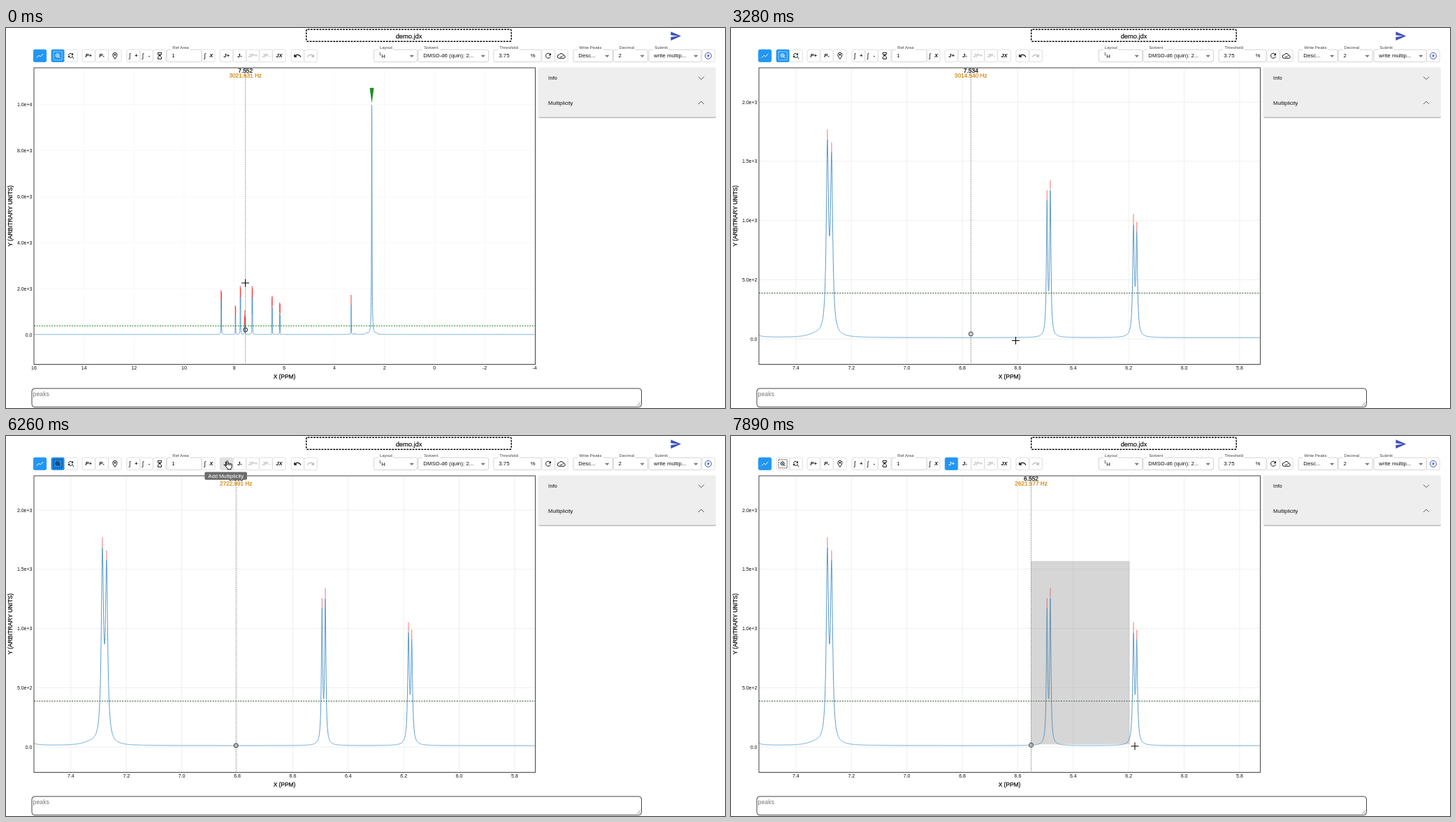
Write an HTML page that moves like this. It is 1029 px wide and 544 px high and loops after 8 s.

```html
<!DOCTYPE html>
<html lang="en">
<head>
<meta charset="utf-8">
<title>Spectrum viewer</title>
<style>
  html, body { margin: 0; width: 100%; height: 100%; overflow: hidden; background: #fff; }
  svg { display: block; width: 100vw; height: 100vh; font-family: "Liberation Sans", Arial, sans-serif; }
</style>
</head>
<body>
<svg id="stage" viewBox="0 0 1029 544"></svg>
<script>
const LOOP = 8000;
const MHZ = 400.13;
const PLOT = { x: 40, y: 57, width: 717.5, height: 424.5 };
const BLUE = '#2196f3', INDIGO = '#3f51b5', INK = '#111';
const stage = document.getElementById('stage');

function set(el, attrs) {
  for (const key in attrs) el.setAttribute(key, attrs[key]);
  return el;
}
function add(parent, tag, attrs, text = '') {
  const el = set(document.createElementNS('http://www.w3.org/2000/svg', tag), attrs);
  el.textContent = text;
  return parent.appendChild(el);
}
function show(el, on) {
  el.style.display = on ? '' : 'none';
}
const label = (parent, x, y, size, text, attrs = {}) =>
  add(parent, 'text', { x, y, 'font-size': size, fill: INK, ...attrs }, text);
const box = (parent, x, y, width, height, attrs) =>
  add(parent, 'rect', { x, y, width, height, fill: 'none', ...attrs });
const line = (parent, d, stroke, attrs = {}) =>
  add(parent, 'path', { d, fill: 'none', stroke, ...attrs });
const centered = { 'text-anchor': 'middle' };
const strong = color => ({ ...centered, fill: color, stroke: color, 'stroke-width': .2 });

function range(from, to, step) {
  const count = Math.round((to - from) / step);
  return Array.from({ length: count + 1 }, (_, i) => from + i * step);
}

// ---- Spectrum
// Each line is [ppm, height, half width]; the inner lines of a triplet are the tallest.
function multiplet(centre, height, count, spacing, width) {
  const middle = (count - 1) / 2;
  return range(-middle, middle, 1).map(k =>
    [centre - k * spacing, height * (1 - .08 * k) * (Math.abs(k) === 1 ? .55 : 1), width]);
}
const marked = [
  multiplet(8.519, 1270, 2, .012, .005),
  multiplet(7.95, 720, 2, .011, .004),
  multiplet(7.752, 1440, 2, .013, .005),
  multiplet(7.573, 590, 3, .018, .004),
  multiplet(7.2789, 1479, 2, .0151, .0048),
  multiplet(6.4886, 1150, 2, -.0119, .0027),
  multiplet(6.1769, 862, 2, .0118, .0034),
  multiplet(3.33, 1290, 1, 0, .005)
].flat();
const solvent = [2.505, 10050, .011];
const traces = [[7.33, 22, .03], [3.18, 60, .01], [2.7, 60, .03], [2.33, 60, .02]];
const lines = [...marked, solvent, ...traces];
const intensity = ppm => lines.reduce(
  (sum, [at, height, w]) => sum + height * w * w / (w * w + (ppm - at) ** 2), 10);

const overview = {
  x: ppm => 40 + (16 - ppm) * 35.83, y: v => 439 - v * .03295,
  from: -4, to: 16, step: .002, ppmTicks: range(-4, 16, 2), yTicks: range(0, 10000, 2000),
  digits: 0, grid: '#f8f8f8', threshold: '#1c8a1c', markOpacity: .9
};
const zoomed = {
  x: ppm => 92.9 + (7.4 - ppm) * 396.9, y: v => 445 - v * .1695,
  from: 5.72, to: 7.54, step: .0005, ppmTicks: range(5.8, 7.4, .2), yTicks: range(0, 2000, 500),
  digits: 1, grid: '#efefef', threshold: '#355a35', markOpacity: .65
};

function drawView(view) {
  const g = add(stage, 'g');
  for (const ppm of view.ppmTicks) {
    const x = view.x(ppm);
    line(g, `M${x} ${PLOT.y}v${PLOT.height}`, view.grid);
    label(g, x, 488.6, 7, ppm.toFixed(view.digits), centered);
  }
  for (const v of view.yTicks) {
    const y = view.y(v);
    line(g, `M${PLOT.x} ${y}h${PLOT.width}`, view.grid);
    label(g, 37.5, y + 2.5, 7, v ? v.toExponential(1) : '0.0', { 'text-anchor': 'end' });
  }
  const inner = add(g, 'g', { 'clip-path': 'url(#plot)' });
  const points = range(view.from, view.to, view.step)
    .map(ppm => view.x(ppm).toFixed(2) + ' ' + view.y(intensity(ppm)).toFixed(1));
  line(inner, 'M' + points.join('L'), '#5b9bcc', { 'stroke-linejoin': 'round' });
  for (const [ppm] of marked) {
    line(inner, `M${view.x(ppm)} ${view.y(intensity(ppm))}v-14`, '#f5281e', { opacity: view.markOpacity });
  }
  const [ppm, height] = solvent;
  add(inner, 'path', { d: `M${view.x(ppm)} ${view.y(height)}l-3-22h6z`, fill: '#1f8f1f' });
  const threshold = Math.floor(view.y(387)) + .5;
  line(inner, `M${PLOT.x} ${threshold}h${PLOT.width}`, view.threshold, { 'stroke-dasharray': '2 1.6' });
  return g;
}

add(add(stage, 'clipPath', { id: 'plot' }), 'rect', PLOT);
const overviewLayer = drawView(overview);
const zoomedLayer = drawView(zoomed);

const brush = box(stage, 0, 0, 0, 0, { fill: '#777', 'fill-opacity': .3 });
add(stage, 'rect', { ...PLOT, fill: 'none', stroke: '#444' });
label(stage, 398.5, 501.7, 8.4, 'X (PPM)', strong('#000'));
label(stage, 0, 0, 8.3, 'Y (ARBITRARY UNITS)', { ...strong('#000'), transform: 'translate(9.3 269) rotate(-90)' });

const probe = add(stage, 'g');
line(probe, `M0 ${PLOT.y}v${PLOT.height}`, '#555', { 'stroke-width': .8, 'stroke-dasharray': '1.3 1.4' });
const dot = add(probe, 'circle', { r: 3, fill: '#777', 'fill-opacity': .2, stroke: '#333' });
const ppmText = label(probe, 0, 63.8, 8.4, '', strong('#000'));
const hzText = label(probe, 0, 71.2, 8.2, '', strong('#d48209'));

// ---- Header, side panel and text area
box(stage, 429.7, 2, 293.5, 17.3, { rx: 2, stroke: '#000', 'stroke-width': 1.4, 'stroke-dasharray': '2.8 1.4' });
label(stage, 576.5, 15.2, 9.3, 'demo.jdx', strong(INK));
add(stage, 'path', { d: 'M2 21L23 12 2 3v7l15 2-15 2z', fill: INDIGO, transform: 'translate(950 3.2) scale(.7)' });
box(stage, 762, 58, 254, 71, { fill: '#bbb', rx: 2 });
box(stage, 761.5, 56.5, 254.5, 71, { fill: '#eee', rx: 2 });
label(stage, 776, 74.2, 7.7, 'Info');
label(stage, 776, 109.7, 7.7, 'Multiplicity');
line(stage, 'M991 69.7l4 4 4-4M991 109l4-4 4 4', '#555');
box(stage, 37, 516, 872.5, 26.7, { rx: 4, stroke: '#444' });
label(stage, 38.5, 526.8, 8.8, 'peaks', { fill: '#777' });
line(stage, 'M903 541l5-5M906 541l2-2', '#666', { 'stroke-width': .7 });

// ---- Toolbar
const PITCH = 18.85, MIDDLE = 39.8;
const button = (x, width = PITCH - .4, stroke = '#d8d8d8') =>
  box(stage, x, 31, width, 17.5, { rx: 2, fill: '#fff', stroke, 'stroke-width': .8 });
const caption = (text, color = INK) => x =>
  label(stage, x, 42.4, 7.6, text, { ...centered, fill: color, 'font-weight': 700, 'font-style': 'italic' });
// Icons use a 24 unit grid: one stroked path and one filled path.
const icon = (outline, solid = '', color = INK, flip = 1) => x => {
  const g = add(stage, 'g', {
    transform: `translate(${x} ${MIDDLE}) scale(${.5 * flip} .5) translate(-12 -12)`, stroke: color, 'stroke-width': 2
  });
  add(g, 'path', { d: outline, fill: 'none' });
  add(g, 'path', { d: solid, fill: color, stroke: 'none' });
  return g;
};
const integral = sign => x => {
  label(stage, x - 6.5, 43, 9.5, '∫', { 'font-style': 'italic' });
  caption(sign)(x + 4);
};
// Draws adjoining buttons and returns each one with its content.
const group = (x, ...contents) => contents.map((draw, i) =>
  ({ frame: button(x + i * PITCH), content: draw(x + i * PITCH + 9.2) }));

function field(x, width, title, value, select = true) {
  button(x, width, '#c8c8c8');
  box(stage, x + 6.3, 29, title.length * 2.9 + 4, 4, { fill: '#fff' });
  label(stage, x + 8.3, 30.3, 6, title, { fill: '#444' });
  label(stage, x + 7.3, 42.3, 7.8, value);
  if (select) add(stage, 'path', { d: `M${x + width - 11} 38.7h6.5l-3.25 3.3z`, fill: '#777' });
}

const undoArrow = 'M12.5 8c-2.6 0-5 1-6.9 2.6L2 7v9h9l-3.6-3.6c1.4-1.2 3.2-1.9 5.1-1.9 3.5 0 6.5 2.3 7.6 5.5l2.4-.8C21 11 17 8 12.5 8z';
const [chart] = group(39.3, icon('M2.5 17.5l7-7 4 4L21.5 6', '', '#fff'));
set(chart.frame, { fill: BLUE, stroke: BLUE });
const [zoomTool] = group(65,
  icon('M14.5 14.5l4 4M16 11a5 5 0 1 1-10 0a5 5 0 1 1 10 0M11 9v4M9 11h4'),
  icon('M5 10a6 6 0 0 1 10.5-3M17 12a6 6 0 0 1-10.5 3M15.5 15.5l5 5', 'M18 4v6h-6zM4 18v-6h6z'));
add(zoomTool.content, 'rect', { x: 0, y: 0, width: 24, height: 24, fill: 'none', 'stroke-dasharray': '3.2 2.2', 'stroke-width': 1.7 });
group(109, caption('P+'), caption('P-'),
  icon('M12 21c-3-4-6-8-6-12a6 6 0 0 1 12 0c0 4-3 8-6 12z', 'M12 6.5a2.5 2.5 0 1 0 .1 0'));
group(173, integral('+'), integral('-'), icon('M7 3h10v5l-4 4 4 4v5H7v-5l4-4-4-4z', 'M7 8h10l-5 5z'));
field(230, 50, 'Ref Area', '1', false);
group(280.5, integral('X'));
const [addTool] = group(306.3, caption('J+'), caption('J-'), caption('JP+', '#bbb'), caption('JP-', '#bbb'), caption('JX'));
group(408, icon('', undoArrow), icon('', undoArrow, '#bbb', -1));

field(526.5, 62, 'Layout', '');
label(stage, 534, 38.7, 5.8, '1');
label(stage, 537.2, 42.5, 7.8, 'H');
field(590, 100.5, 'Solvent', 'DMSO-d6 (quin): 2...');
field(698, 68, 'Threshold', '3.75', false);
label(stage, 750.7, 42.3, 7.6, '%');
group(766.8, icon('M18 8a7 7 0 1 0 .8 6', 'M20 4v7h-7z'),
  icon('M6 19a5 5 0 0 1-.5-10a7 7 0 0 1 13 2a4 4 0 0 1 .5 8zM8 13.5l3 3 5-5'));
field(812, 56, 'Write Peaks', 'Desc...');
field(869.3, 49, 'Decimal', '2');
field(920, 75, 'Submit', 'write multip...');
group(995.8, icon('M21 12a9 9 0 1 1-18 0a9 9 0 1 1 18 0', 'M10 7.5v9l6-4.5z', INDIGO));

const tooltip = add(stage, 'g');
box(tooltip, 284.3, 51.5, 60.7, 11.2, { rx: 2, fill: '#6d6d6d' });
label(tooltip, 314.7, 59.8, 7.6, 'Add Multiplicity', { ...centered, fill: '#fff' });

const cross = line(stage, 'M-5.5 0h11M0-5.5v11', '#000');
const hand = add(stage, 'path', {
  d: 'M-2.5 1.5V-5q1-1.6 2 0v3.5q1-1 2 0 1-.8 2 .3 1.2-.6 1.7.6V3q-.5 1.5-1.2 2.5v1.3h-5V5.5L-4.5 1.5q-.2-1.5 2 0zM-.5-1.5V1M1.5-1.5V1M3.5-1.2V1',
  fill: '#fff', stroke: '#000', 'stroke-width': .9
});

// ---- Motion
const FIRST_DRAG = 750, RELEASE = 2540, ZOOM = 3280, LEAVE = 4330, HOVER = 4930;
const PRESS = 6260, SWITCH = 6410, RETURN = 6560, SECOND_DRAG = 7450;

// A leg moves along a quadratic curve in equal steps; the first step lands at its start time.
const leg = (start, end, steps, via, to) => ({ start, end, steps, via, to });
const pointerStart = [342.5, 365];
const pointerLegs = [
  leg(FIRST_DRAG, 1790, 8, [393, 451], [405, 446]),
  leg(2390, RELEASE, 2, [406, 447], [407.5, 447.5]),
  leg(LEAVE, 4780, 4, [370, 260], [319, 40]),
  leg(HOVER, 5360, 4, [318.5, 41], [318, 41]),
  leg(RETURN, 7010, 4, [462, 120], [429, 179.3]),
  leg(SECOND_DRAG, 7890, 4, [545, 444], [578, 444])
];
// The probe is tracked by its frequency in Hz.
const probeStart = [3021.631];
const probeLegs = [
  leg(150, 150, 1, [3014.54], [3014.54]),
  leg(LEAVE, 4780, 4, [2660], [2722.08]),
  leg(HOVER, HOVER, 1, [2722.691], [2722.691]),
  leg(RETURN, 7010, 4, [2630], [2617.787]),
  leg(7150, 7150, 1, [2621.577], [2621.577])
];

// Lag is a fraction of one step.
function track(start, legs, t, lag = 0) {
  const index = legs.findLastIndex(l => l.start <= t);
  if (index < 0) return start;
  const from = index ? legs[index - 1].to : start;
  const { start: begin, end, steps, via, to } = legs[index];
  const gap = (end - begin) / (steps - 1) || 1;
  const step = Math.min(steps, Math.floor((t - begin) / gap + 1.001));
  const u = (step - lag) / steps, v = 1 - u;
  return from.map((a, i) => v * v * a + 2 * u * v * via[i] + u * u * to[i]);
}

function drawBrush(t) {
  const first = t >= FIRST_DRAG && t < RELEASE, second = t >= SECOND_DRAG;
  show(brush, first || second);
  if (!first && !second) return;
  const [x, y] = first ? [343.5, 363.8] : [429.5, 179];
  const [right, bottom] = track(pointerStart, pointerLegs, t, .4);
  set(brush, { x, y, width: right - x, height: bottom - y });
}

function drawToolbar(t) {
  const pressed = t >= PRESS, adding = t >= SWITCH;
  const zoomFill = adding ? '#fff' : pressed ? '#1e88e5' : BLUE;
  set(zoomTool.frame, { fill: zoomFill, stroke: adding ? '#d8d8d8' : zoomFill });
  set(zoomTool.content, { stroke: pressed ? INK : '#fff' });
  set(addTool.frame, { fill: adding ? BLUE : t >= HOVER ? '#e2e2e2' : '#fff', stroke: adding ? BLUE : '#d8d8d8' });
  set(addTool.content, { fill: adding ? '#fff' : INK });
  show(tooltip, t >= HOVER && t < RETURN);
}

function drawProbe(t) {
  // After zooming, the probe keeps its old place until the pointer moves.
  const view = t < LEAVE ? overview : zoomed;
  const [hz] = track(probeStart, probeLegs, t);
  const ppm = hz / MHZ;
  set(probe, { transform: `translate(${view.x(ppm)} 0)` });
  set(dot, { cy: view.y(intensity(ppm)) });
  ppmText.textContent = ppm.toFixed(3);
  hzText.textContent = hz.toFixed(3) + ' Hz';
}

function drawPointer(t) {
  const [x, y] = track(pointerStart, pointerLegs, t);
  const overToolbar = y < PLOT.y;
  show(cross, !overToolbar);
  show(hand, overToolbar);
  set(overToolbar ? hand : cross, { transform: `translate(${x} ${y})` });
}

function render(t) {
  show(overviewLayer, t < ZOOM);
  show(zoomedLayer, t >= ZOOM);
  drawProbe(t);
  drawBrush(t);
  drawToolbar(t);
  drawPointer(t);
}

function tick() {
  render(performance.now() % LOOP);
  requestAnimationFrame(tick);
}
tick();
</script>
</body>
</html>
```
